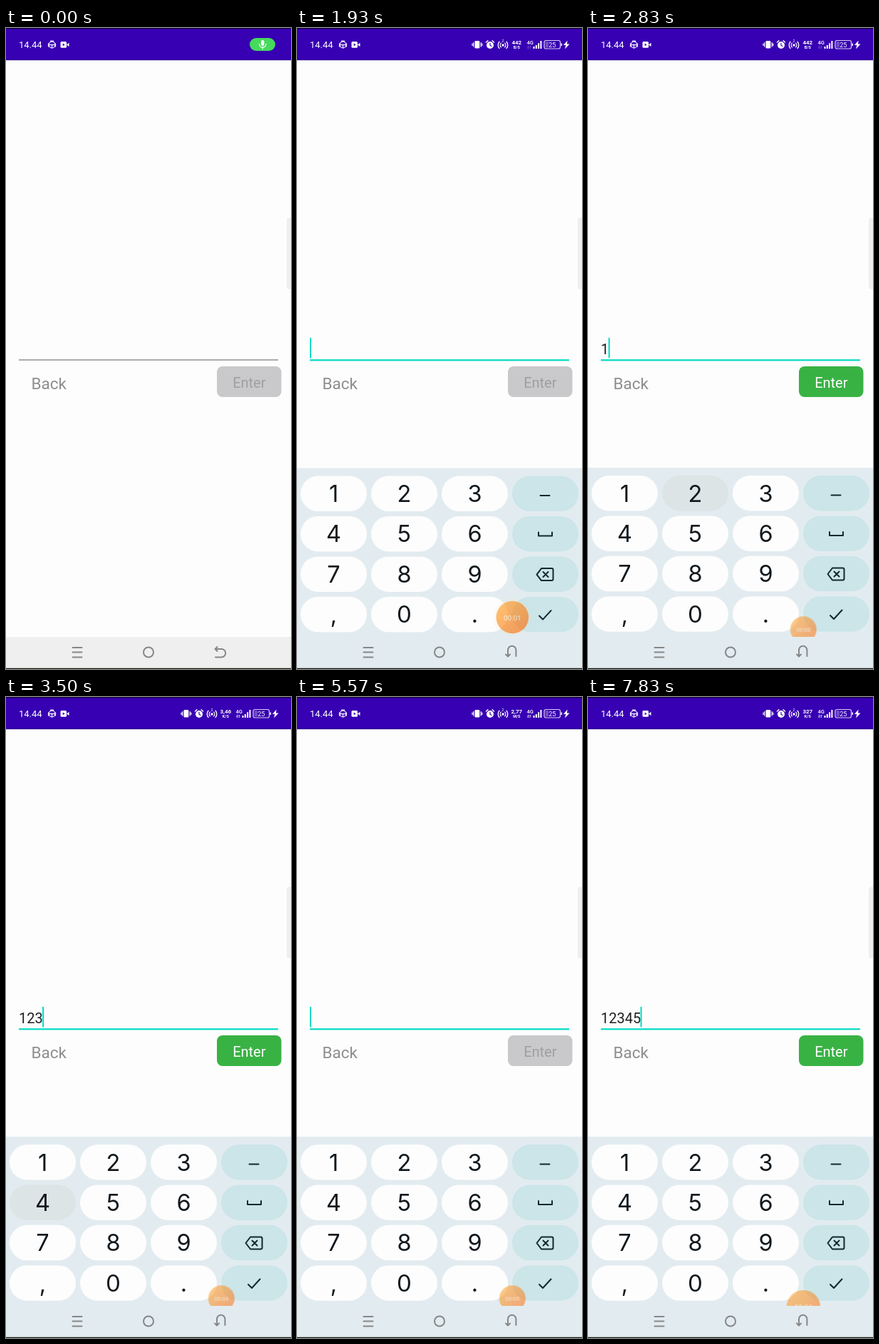
These frames come from a looping animation (400 px wide and 898 px high, 8 s). An HTML page:

```html
<!DOCTYPE html>
<html lang="en">
<head>
<meta charset="utf-8">
<title>Number entry</title>
<style>
html, body { margin: 0; width: 100%; height: 100%; overflow: hidden; background: #fdfdfd; }
svg { display: block; width: 100vw; height: 100vh; }
text { font-family: Roboto, Arial, sans-serif; }
.mid { text-anchor: middle; }
.line { fill: none; stroke-linecap: round; stroke-linejoin: round; }
.digit { font: 32.5px Inter, "Open Sans", sans-serif; fill: #11181c; }
.zero { font-family: Lato, "Open Sans", sans-serif; }
.key { fill: #fdfdfe; }
.key.fn { fill: #cbe5e8; }
.key.down { fill: #dce4e6; }
.key.fn.down { fill: #c2dadd; }
.nav { stroke: #878787; stroke-width: 2; }
.hook { transform-origin: 300px 874px; }
.typing .hook { transform: rotate(-90deg); }
.enter rect { fill: #c9c9cb; }
.enter text { fill: #9f9fa1; }
.enter.ready rect { fill: #39b244; }
.enter.ready text { fill: #fff; }

#board, #ball, #ring, #chip, #icons { animation: 8s linear infinite; }
#board { animation-name: board; }
#ball { animation-name: ball; transform-origin: 302px 826px; }
#ring { animation-name: ring; }
#chip { animation-name: chip; transform-origin: 374px 23px; }
#icons { animation-name: icons; }
@keyframes board {
  0%, 20.2% { transform: translateY(282px); animation-timing-function: cubic-bezier(.2, .6, .3, 1); }
  24.5%, 100% { transform: none; }
}
@keyframes ball {
  0%, .5% { opacity: 0; transform: scale(.2); animation-timing-function: ease-out; }
  6% { opacity: 1; transform: none; }
  21% { opacity: 1; }
  25% { opacity: .52; }
  25.5% { transform: none; animation-timing-function: ease-in-out; }
  30%, 73.6% { opacity: .52; transform: translateY(17px) scale(.81); animation-timing-function: step-end; }
  73.7%, 100% { opacity: .52; transform: translateY(29px) scale(1.04); }
}
@keyframes ring { 0%, 21% { opacity: 1; } 25%, 100% { opacity: 0; } }
@keyframes chip {
  0%, .4% { opacity: 1; transform: none; animation-timing-function: ease-in; }
  6% { opacity: 1; transform: scale(.25); }
  8%, 100% { opacity: 0; transform: scale(.1); }
}
@keyframes icons { 0%, 5.5% { opacity: 0; } 9.6%, 100% { opacity: 1; } }
</style>
</head>
<body>
<svg id="stage" viewBox="0 0 400 898" preserveAspectRatio="none">
  <defs>
    <linearGradient id="fire" x1="0" y1="0" x2="1" y2="1">
      <stop offset="0" stop-color="#ffa21a"/><stop offset="1" stop-color="#ff5e00"/>
    </linearGradient>
    <clipPath id="above"><rect width="400" height="853"/></clipPath>
  </defs>

  <rect width="400" height="898" fill="#fdfdfd"/>
  <rect width="400" height="45" fill="#3700b3"/>
  <rect width="400" height="1.2" fill="#100030"/>
  <rect y="44" width="400" height="1.2" fill="#2c0090"/>
  <path d="M400 266h-2a4 4 0 0 0-4 4v92a4 4 0 0 0 4 4h2z" fill="#efefef"/>

  <!-- status bar -->
  <text x="18" y="28" font-size="13" fill="#fff">14.44</text>
  <g class="line" stroke="#e8e0f5" stroke-width="1.4">
    <circle cx="64.5" cy="23.5" r="4.4"/>
    <path d="M60 23.5h9M64.5 23.5v4.5M62.5 18.3h4M59.6 26v-4M69.4 26v-4"/>
  </g>
  <rect x="76.5" y="19" width="8.5" height="8.8" rx="1.5" fill="#fff"/>
  <path d="M85 23.4l3.500-2.700v5.400z" fill="#fff"/>
  <path d="M79.7 21.500v3.800l3-1.900z" fill="#3700b3"/>

  <g id="chip">
    <rect x="342" y="14" width="36" height="18" rx="9" fill="#46da5c"/>
    <rect x="358" y="17" width="4.4" height="8" rx="2.2" fill="#fff"/>
    <path class="line" d="M355.6 22.500a4.600 4.600 0 0 0 9.200 0M360.200 27v2.300" stroke="#fff" stroke-width="1.3"/>
  </g>

  <g id="icons" fill="#fff">
    <rect x="249.5" y="18" width="6.8" height="10.5" rx="1.3"/>
    <path class="line" d="M247.700 20.500v5.500M258.200 20.500v5.500M246 22v2.500M259.800 22v2.500" stroke="#fff" stroke-width="1.2"/>
    <circle cx="271" cy="24" r="5"/>
    <path class="line" d="M265.500 20l2.400-2.200M276.500 20l-2.400-2.200" stroke="#fff" stroke-width="1.5"/>
    <path class="line" d="M271 21.300v3l2 1.200" stroke="#3700b3" stroke-width="1.2"/>
    <circle cx="289" cy="24" r="1.7"/>
    <path class="line" d="M286.300 26.700a4 4 0 0 1 0-5.600M291.700 26.700a4 4 0 0 0 0-5.600M284 28.500a6.800 6.800 0 0 1 0-9.200M294 28.500a6.800 6.800 0 0 0 0-9.200" stroke="#fff" stroke-width="1.3"/>
    <text class="mid" x="289" y="20" font-size="5">2</text>
    <text id="rate" class="mid" x="308.3" y="22.5" font-size="8" font-weight="700"></text>
    <text id="unit" class="mid" x="308.3" y="28.5" font-size="5.5" font-weight="700"></text>
    <text class="mid" x="327.3" y="23" font-size="7.5" font-weight="500">4G</text>
    <path id="arrows" class="line" d="M324.500 25.200v3.600l-1-1M327 28.800v-3.600l1 1" stroke="#fff" stroke-width=".9"/>
    <path d="M331.500 26h2v3h-2zM334.800 24h2v5h-2zM338.100 21.200h2v7.800h-2zM341.400 18h2v11h-2z"/>
    <rect x="347" y="17.5" width="22.5" height="11.5" rx="2.5" fill="none" stroke="#d9cdf0" stroke-width="1.2"/>
    <rect x="348.5" y="19" width="4.5" height="8.5" rx="1" opacity=".3"/>
    <path d="M370.500 21.500h1.500v3.500h-1.500z"/>
    <text class="mid" x="358.2" y="26.6" font-size="9">25</text>
    <path d="M379.500 17.500l-5.500 6.500h3.300l-1.300 5.500 6.500-7h-3.500z"/>
  </g>

  <!-- form -->
  <rect id="rule" x="18" width="364"/>
  <text id="entry" x="18" y="457" font-size="20" fill="#202020"></text>
  <rect id="caret" y="434" width="2" height="28.5" fill="#03dac5"/>
  <text x="35.5" y="506" font-size="22.5" fill="#8e8e90">Back</text>
  <g id="enter" class="enter">
    <rect x="296" y="474" width="90.5" height="43" rx="8"/>
    <text class="mid" x="341.3" y="504" font-size="20">Enter</text>
  </g>

  <!-- system bar and keypad -->
  <rect y="853" width="400" height="45" fill="#efefef"/>
  <g id="board">
    <rect y="616" width="400" height="282" fill="#e2ecf0"/>
    <g id="keys"></g>
    <g class="line" stroke="#12282e" stroke-width="2">
      <path d="M341.500 654.500h13M339 706v5h19v-5"/>
      <path d="M343 756.500h14.500a2 2 0 0 1 2 2v13a2 2 0 0 1-2 2h-14.500l-6.500-8.500zM345.500 761.500l7 7M352.500 761.500l-7 7"/>
      <path d="M340 823l5 5 11.500-12.500"/>
    </g>
  </g>
  <g class="line nav">
    <path d="M93.500 868h13M93.500 874.500h13M93.500 881.500h13"/>
    <circle cx="200" cy="874.5" r="7"/>
    <path class="hook" d="M296.500 867l-3 3 3 3M294 870h8.500a5.700 5.700 0 0 1 0 11.400h-8.500"/>
  </g>
  <rect y="896.8" width="400" height="1.2" fill="#15150c"/>

  <g clip-path="url(#above)">
    <g id="ball">
      <circle id="ring" cx="302.3" cy="825.5" r="26.5" fill="#fbdcae"/>
      <circle cx="302.3" cy="825.5" r="22.8" fill="url(#fire)"/>
      <text id="timer" class="mid" x="302.3" y="829.5" font-size="9.8" fill="#ffeccb"></text>
    </g>
  </g>
</svg>
<script>
const $ = id => document.getElementById(id);
const LOOP = 8000, FOCUS = 1600;
const LEAD = 30; // makes up for the first painted frame

// start time, value
const entries = [[1630, ""], [2500, "1"], [2900, "12"], [3170, "123"], [3570, "1234"],
  [4600, "123"], [4870, "12"], [5170, "1"], [5400, ""],
  [6170, "1"], [6430, "12"], [6630, "123"], [6900, "1234"], [7830, "12345"]];
const rates = [[0, "1,20 K/S"], [1100, "442 B/S"], [3100, "3,46 K/S"], [5100, "2,77 M/S"], [7170, "327 K/S"]];
const ticks = [[0, 0], [900, 1], [2060, 2], [2870, 3], [3930, 4], [4900, 5], [5900, 6]];
// key, pressed from, released
const presses = [["1", 2430, 2500], ["2", 2830, 2900], ["3", 3100, 3170], ["4", 3500, 3570],
  ["del", 4500, 4600], ["del", 4800, 4870], ["del", 5100, 5170], ["del", 5330, 5400],
  ["1", 6100, 6170], ["2", 6370, 6430], ["3", 6570, 6630], ["4", 6830, 6900], ["5", 7770, 7830]];

const layout = [["1", "2", "3", "dash"], ["4", "5", "6", "space"], ["7", "8", "9", "del"], [",", "0", ".", "ok"]];
const caps = {};

function add(tag, attrs, label = "") {
  const el = document.createElementNS("http://www.w3.org/2000/svg", tag);
  for (const name in attrs) el.setAttribute(name, attrs[name]);
  el.textContent = label;
  $("keys").append(el);
  return el;
}

layout.forEach((row, r) => row.forEach((name, c) => {
  const x = 5 + c * 99, y = 627 + r * 56.4;
  caps[name] = add("rect", { x, y, width: 93, height: 49.5, rx: 24.7, class: c === 3 ? "key fn" : "key" });
  if (c < 3) add("text", { x: x + 46.5, y: y + 36.5, class: "digit mid" + (name === "0" ? " zero" : "") }, name);
}));

const at = (list, t) => list.reduce((hit, item) => item[0] <= t ? item : hit, null);
const setText = (id, s) => { if ($(id).textContent !== s) $(id).textContent = s; };
const clock = document.getAnimations()[0];

function draw(t) {
  const focused = t >= FOCUS;
  const entry = at(entries, t);
  const value = entry ? entry[1] : "";
  const [rate, unit] = at(rates, t)[1].split(" ");

  setText("entry", value);
  setText("rate", rate);
  setText("unit", unit);
  setText("timer", "00:0" + at(ticks, t)[1]);
  $("arrows").setAttribute("opacity", t < 3100 ? .35 : 1);

  $("rule").setAttribute("y", focused ? 464.2 : 464.4);
  $("rule").setAttribute("height", focused ? 2.2 : 1.2);
  $("rule").setAttribute("fill", focused ? "#03dac5" : "#777777");
  $("caret").setAttribute("x", 18 + value.length * 11.23 - (value ? .6 : 0));
  $("caret").setAttribute("opacity", entry && (t - entry[0]) % 1000 < 500 ? 1 : 0);
  $("enter").classList.toggle("ready", value !== "");
  $("stage").classList.toggle("typing", t >= 1700);

  for (const name in caps) {
    const down = presses.some(([key, from, to]) => key === name && t >= from && t < to);
    caps[name].classList.toggle("down", down);
  }
}

function frame() {
  const now = clock && clock.currentTime !== null ? clock.currentTime : performance.now();
  draw((now + LEAD) % LOOP);
  requestAnimationFrame(frame);
}
draw(0);
requestAnimationFrame(frame);
</script>
</body>
</html>
```
